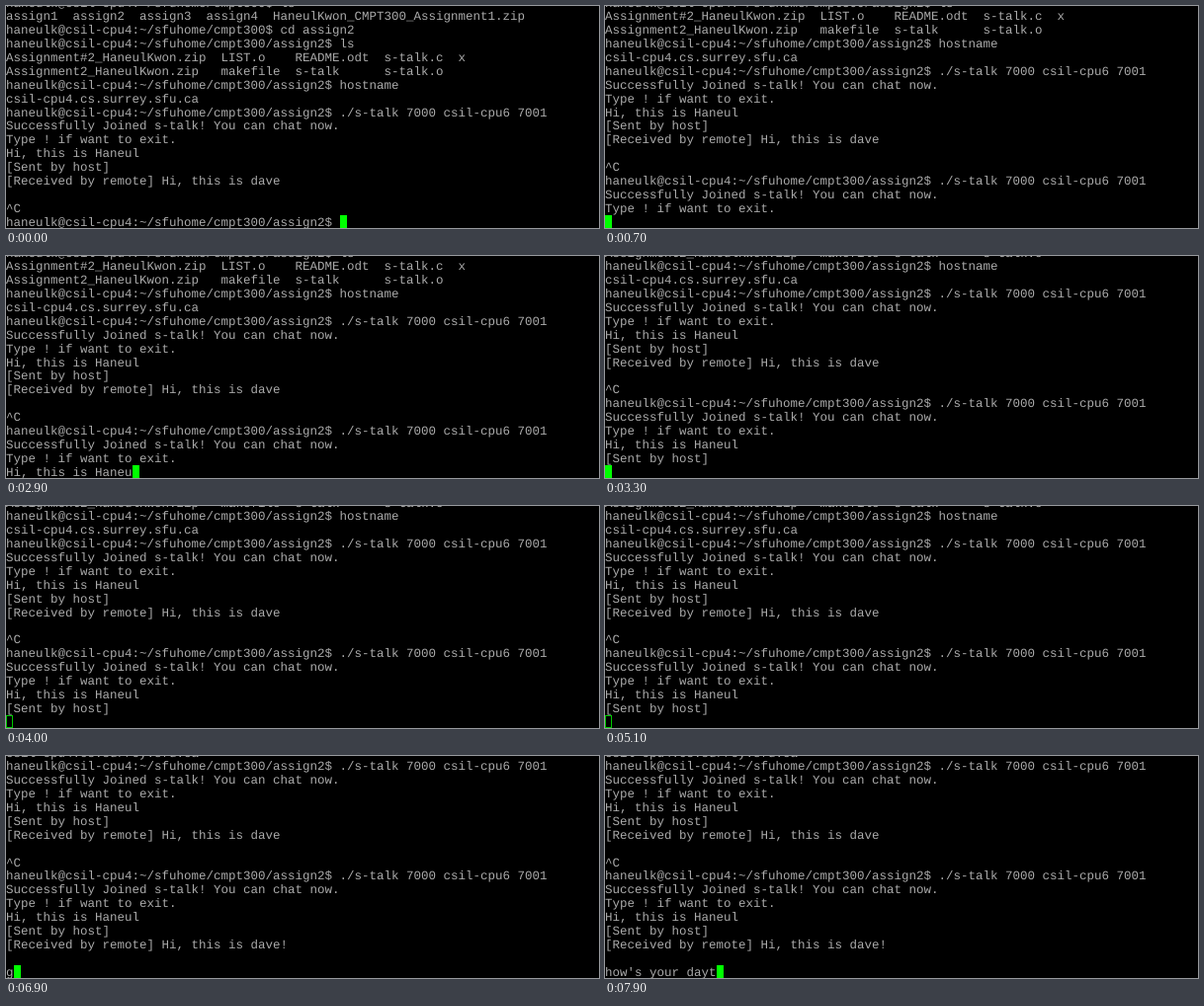
These frames come from a looping animation (600x225 px, 8000 ms). An HTML page:

```html
<!DOCTYPE html>
<html lang="en">
<head>
<meta charset="utf-8">
<title>Terminal chat</title>
<style>
html, body { margin: 0; width: 100%; height: 100%; overflow: hidden; background: #000; }
#stage { position: relative; width: 600px; height: 225px; overflow: hidden; }
#screen {
  position: absolute; left: 0; bottom: -2.4px; margin: 0; color: #aaa;
  font: 12.5px/13.88px "Liberation Mono", "Courier New", monospace;
  font-variant-ligatures: none; text-rendering: geometricPrecision;
}
#cursor {
  position: absolute; top: 212px; width: 7px; height: 13px;
  box-sizing: border-box; background: #0f0;
}
#cursor.hollow { background: none; border: 1px solid #00c800; }
</style>
</head>
<body>
<div id="stage"><div id="cursor"></div><pre id="screen"></pre></div>
<script>
const LOOP = 8000, CHAR = 7.5;
const home = "haneulk@csil-cpu4:~/sfuhome/cmpt300";
const prompt = home + "/assign2$ ";
const command = "./s-talk 7000 csil-cpu6 7001";
const greeting = "Hi, this is Haneul";
const reply = "[Received by remote] Hi, this is dave";
const joined = ["Successfully Joined s-talk! You can chat now.", "Type ! if want to exit."];

const history = [
  home + "$ ls",
  "assign1  assign2  assign3  assign4  HaneulKwon_CMPT300_Assignment1.zip",
  home + "$ cd assign2",
  prompt + "ls",
  "Assignment#2_HaneulKwon.zip  LIST.o    README.odt  s-talk.c  x",
  "Assignment2_HaneulKwon.zip   makefile  s-talk      s-talk.o",
  prompt + "hostname",
  "csil-cpu4.cs.surrey.sfu.ca",
  prompt + command,
  ...joined, greeting, "[Sent by host]", reply, "", "^C"
];

const screen = document.getElementById("screen");
const cursor = document.getElementById("cursor");

// Text typed so far, one key every `step` ms from `start`
const typed = (text, t, start, step) =>
  text.slice(0, Math.max(0, 1 + Math.floor((t - start) / step)));

function linesAt(t) {
  if (t < 700) return [...history, prompt + (t < 95 ? "" : command)];
  const lines = [...history, prompt + command, ...joined];
  if (t < 3050) return [...lines, typed(greeting, t, 2150, 45)];
  lines.push(greeting, "[Sent by host]");
  if (t < 5800) return [...lines, ""];
  lines.push(reply + "!", "");
  const input = t >= 6800 && t < 7050 ? "g" : typed("how's your dayt", t, 7190, 50);
  return [...lines, input];
}

function draw(now) {
  const t = now % LOOP;
  const lines = linesAt(t);
  const text = lines.join("\n") + " ";
  if (screen.textContent !== text) screen.textContent = text;
  cursor.style.left = lines.at(-1).length * CHAR + "px";
  cursor.className = t >= 3500 && t < 6300 ? "hollow" : "";
}

const start = performance.now();
function frame() {
  draw(performance.now() - start);
  requestAnimationFrame(frame);
}
frame();
</script>
</body>
</html>
```
